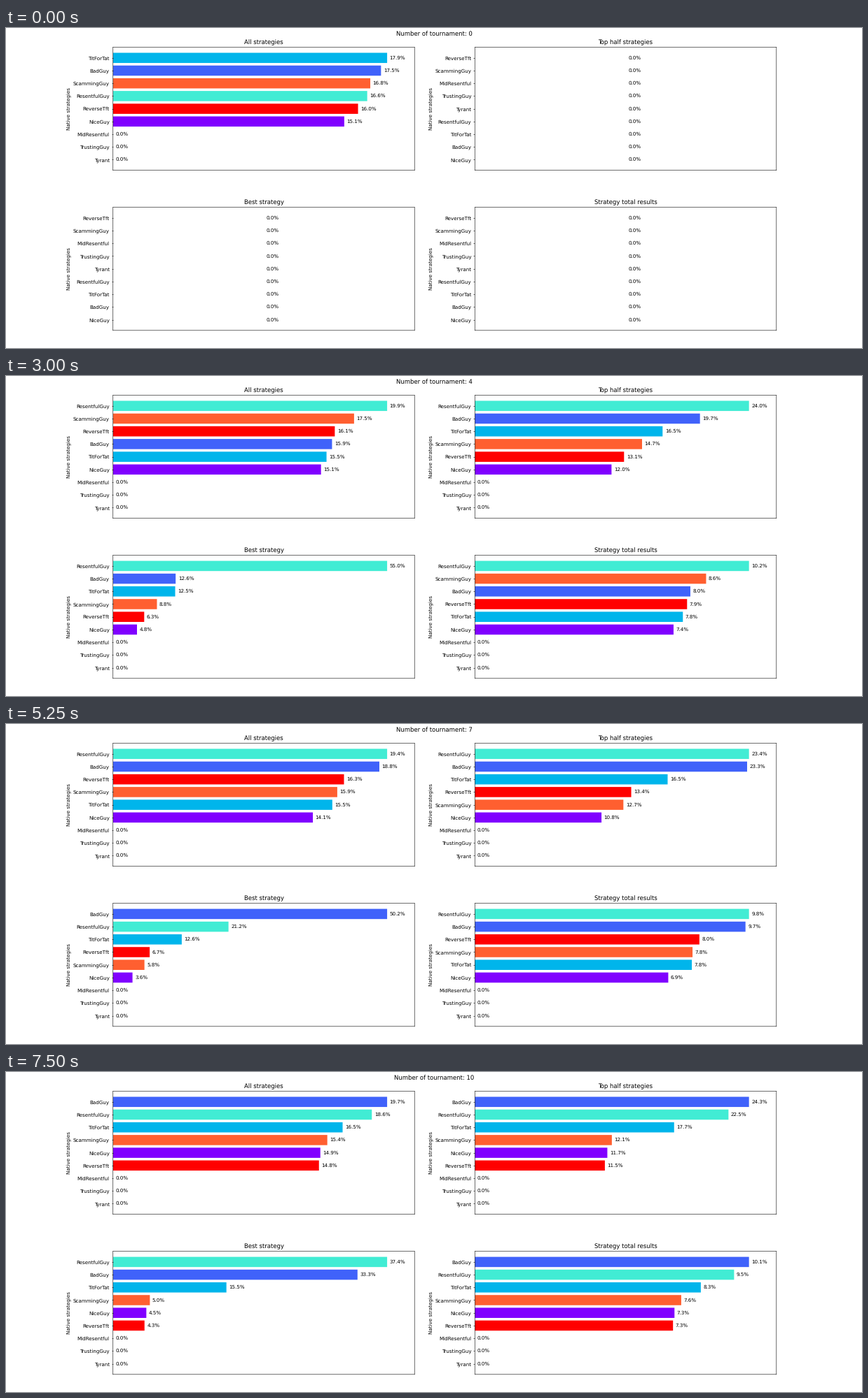
A matplotlib script that plays this animation: 1222x458 px, repeating every 8 s.

```python
import matplotlib.pyplot as plt
import numpy as np
from matplotlib.animation import FuncAnimation

W, H, DPI = 1222, 458, 51
INTERVAL, FRAMES, HOLD = 250, 32, 3

plt.rcParams.update({"font.family": "DejaVu Sans", "text.hinting": "none",
                     "path.snap": False})

NAMES = ["NiceGuy", "BadGuy", "TitForTat", "ResentfulGuy", "Tyrant",
         "TrustingGuy", "MidResentful", "ScammingGuy", "ReverseTft"]
COLORS = plt.get_cmap("rainbow")(np.linspace(0, 1, len(NAMES)))
TITLES = ["All strategies", "Top half strategies",
          "Best strategy", "Strategy total results"]

# Active strategies: edge among strong opponents, then the path of the share
# in percent through the key tournaments.
KEYS = (0, 2, 4, 8, 10)
PATHS = {
    "NiceGuy": (-2.8, (15.1, 14.4, 15.1, 13.8, 14.9)),
    "BadGuy": (4.0, (17.5, 16.6, 15.9, 19.8, 19.7)),
    "TitForTat": (1.2, (17.9, 16.5, 15.5, 15.5, 16.5)),
    "ResentfulGuy": (3.5, (16.6, 16.7, 19.9, 19.2, 18.6)),
    "ScammingGuy": (-3.0, (16.8, 17.9, 17.5, 15.3, 15.4)),
    "ReverseTft": (-2.9, (16.0, 17.8, 16.1, 16.4, 14.8)),
}
ACTIVE = [NAMES.index(name) for name in PATHS]
EDGE = np.array([edge for edge, _ in PATHS.values()])
SWING = np.array([{"BadGuy": -1, "ResentfulGuy": 1}.get(name, 0)
                  for name in PATHS])

fig, axes = plt.subplots(2, 2, figsize=(W / DPI, H / DPI), dpi=DPI)
fig.subplots_adjust(left=0.125, right=0.9, top=0.94, bottom=0.055,
                    wspace=0.2, hspace=0.3)
heading = fig.suptitle("", y=1 - 11 / H, va="baseline", fontsize=12)


def standings(n):
    """Shares of the active strategies in the four panels."""
    overall = np.array([np.interp(n, KEYS, path) for _, path in PATHS.values()])
    if n == 0:
        return [overall] + [np.zeros(len(overall))] * 3
    mean = 100 / len(overall)
    top = mean + 1.2 * (overall - mean) + EDGE
    # The two leaders take turns at winning the final.
    lead = 0.45 * np.sin(2 * np.pi * (n - 1.5) / 8)
    best = top ** 3 * (1 + lead * SWING)
    best *= 100 / best.sum()
    total = overall + 0.06 * top + 0.01 * best
    return [overall, top, best, total * 50 / total.sum()]


def draw_panel(ax, title, shares):
    values = np.zeros(len(NAMES))
    values[ACTIVE] = shares
    order = np.argsort(values, kind="stable")
    rows = np.arange(len(NAMES))
    ax.clear()
    bars = ax.barh(rows, values[order], color=COLORS[order], height=0.8)
    ax.bar_label(bars, fmt="%.1f%%", padding=5)
    ax.set_yticks(rows, [NAMES[i] for i in order])
    ax.set_xticks([])
    peak = values.max()
    ax.set_xlim((0, 1.1 * peak) if peak > 0 else (-1, 1))
    ax.set_ylim(-0.84, 8.84)
    ax.set_title(title)
    ax.set_ylabel("Native strategies")


def update(frame):
    n = frame // HOLD
    heading.set_text(f"Number of tournament: {n}")
    for ax, title, shares in zip(axes.flat, TITLES, standings(n)):
        draw_panel(ax, title, shares)
    return []


anim = FuncAnimation(fig, update, frames=FRAMES, init_func=lambda: update(0),
                     interval=INTERVAL, repeat=True, repeat_delay=0, blit=False)
plt.show()
```
